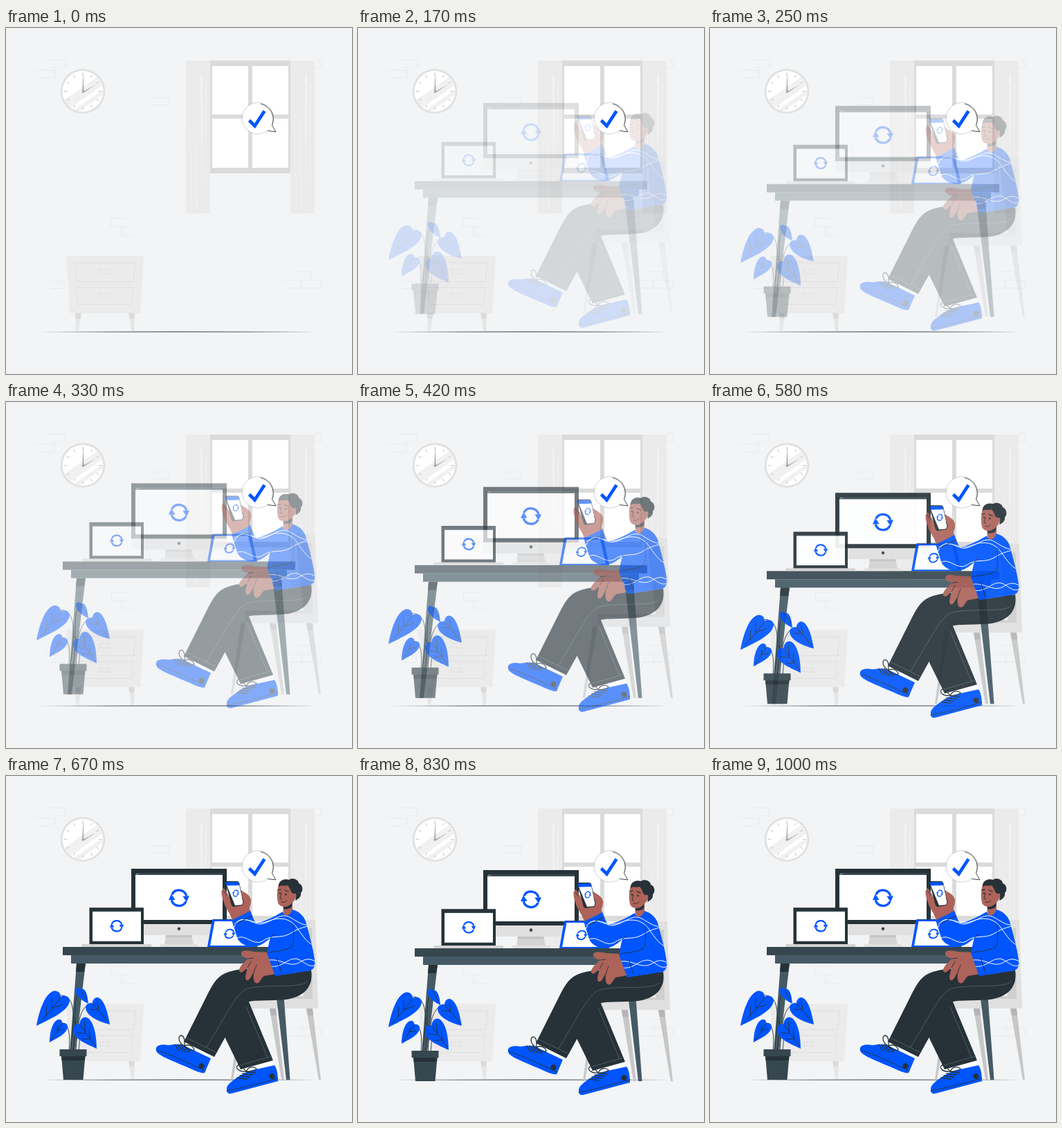
An HTML page for the animation above (1.04 s loop, 500 px wide and 500 px high).

```html
<!DOCTYPE html>
<html lang="en">
<head>
<meta charset="utf-8">
<title>Synced devices</title>
<style>
html, body { margin: 0; width: 100%; height: 100%; overflow: hidden; background: #f2f4f6; }
svg { display: block; width: 100vw; height: 100vh; }
.blue { fill: #05f; }
.ink { fill: #263238; }
.slate { fill: #37474f; }
.steel { fill: #455a64; }
.white { fill: #fff; }
.skin { fill: #ad6359; }
.g1 { fill: #ebebeb; }
.g2 { fill: #e0e0e0; }
.g3 { fill: #dbdbdb; }
.g4 { fill: #c7c7c7; }
.line, .lace { fill: none; stroke: #263238; stroke-width: .9; stroke-linecap: round; stroke-linejoin: round; }
.lace { stroke-width: 1.3; }
.seam { fill: none; stroke: #5c6d75; stroke-width: .7; }
.wave { fill: none; stroke: #fff; stroke-width: 1; }
.pale { fill: none; stroke: #dcdcdc; stroke-width: .8; }
</style>
</head>
<body>
<svg viewBox="0 0 500 500">
  <defs>
    <g id="half">
      <path d="M-10.2 -5A11.3 11.3 0 0 1 10.8 -3" fill="none" stroke="#05f" stroke-width="3.300"/>
      <path class="blue" d="M5.400 -2.600L15 -3L11 5.800Z"/>
    </g>
    <g id="sync"><use href="#half"/><use href="#half" transform="rotate(180)"/></g>
    <path id="sweater" d="M326 208L353 194C355 201 358 207 361 213C375 210 388 203 400 196C401 204 411 203 414 193C424 196 430 202 433 210C439 232 444 250 446 266C447 274 445 279 440 281L389 289L377 256C379 248 380 240 382 234C374 241 366 247 355 247C343 246 334 238 333 230Z"/>
    <clipPath id="knit"><use href="#sweater"/></clipPath>
    <clipPath id="dial"><circle cx="111" cy="91.5" r="29.5"/></clipPath>
    <g id="curtain">
      <path class="g1" d="M0 47H35V268H0Z"/>
      <path fill="#f3f3f3" d="M6 76L8 255L9 255ZM12 67L15 262L16.2 262ZM21 68L22.5 250L24 68ZM28 80L27.5 240L29.5 80Z"/>
    </g>
  </defs>

  <g id="room">
    <path fill="none" stroke="#e5e6e7" stroke-width=".8" d="M58 46H86V57H67M42 61H71V72H48M208 101H236V111H213M176 275H152V287H177M167 288V300H193M446 46H456V57H446M58 366H84V376.500H65M415 352H441V362H427M401 365H427V376H407M428 365H456V376H428"/>
    <path class="g3" d="M295 47H411V210H295Z"/>
    <path class="white" d="M298 55H350V125H298ZM356 55H408V125H356ZM298 131H350V202H298ZM356 131H408V202H356Z"/>
    <use href="#curtain" x="260"/><use href="#curtain" x="411"/>
    <circle class="g2" cx="111" cy="91.5" r="32.300"/>
    <circle class="white" cx="111" cy="91.5" r="29.5"/>
    <path clip-path="url(#dial)" fill="#f1f1f1" d="M78 108L136 68L144 80L92 116ZM97 119L142 88L144 93L104 122Z"/>
    <g id="ticks" stroke="#bbb" stroke-width=".8"></g>
    <path d="M110.300 92L111.500 64L112.500 92ZM110.500 92.500L130 81.500L111.500 94Z" fill="#a6a6a6"/>
    <circle cx="111.200" cy="92" r="1.8" fill="#a6a6a6"/>
    <path class="g3" d="M100 412H109L107.500 420H100.500ZM177 412H186L185.500 420H178.500Z"/>
    <path fill="#e6e6e6" d="M100.500 420H107.500L105 438H101ZM178.500 420H185.500L185 438H181Z"/>
    <path class="g1" d="M87 329H199L194 412H92Z"/>
    <path class="pale" d="M100 339H187L184.500 366.500H102ZM101 375H183.500L181.500 399.500H103.500ZM135 349H149.500V355.500H135ZM135 384H149.500V390H135Z"/>
    <path class="ink" d="M48 439Q250 438 452 439Q250 440 48 439Z"/>
  </g>

  <g class="drop">
    <path class="g4" d="M381 336H390L402 439H398ZM434 336H443L455 439H452ZM339 336H346L328 439H325Z"/>
    <path fill="#b5b5b5" d="M381 336H390L391 346H382.500ZM434 336H443L444 346H436Z"/>
    <path class="g2" d="M419 208H447L451 336H345V318H430Z"/>
    <path fill="#cfcfcf" d="M419 220H442L443 322H345V318H430Z"/>
  </g>

  <g class="drop">
    <path class="steel" d="M102 271H115L95 439H89ZM385 271H398L410.500 439H405Z"/>
    <path class="ink" d="M102 271H115L113 283H101ZM385 271H398L399 283H386Z"/>
    <path class="steel" d="M94 259H406V271H94Z"/>
    <path class="slate" d="M82 247H418V259H82Z"/>
  </g>

  <g class="drop">
    <path fill="#d3d3d3" d="M231 229H268L271 244H229Z"/>
    <path class="g2" d="M223 243H277V247H223ZM181 214H319V230H181Z"/>
    <path fill="#c4c4c4" d="M231 230H268L268.500 233H230.500Z"/>
    <path class="ink" d="M181 134H319V214H181Z"/>
    <path class="white" d="M187 143H313V208H187Z"/>
    <path class="slate" d="M187 140H313V143H187Z"/>
    <path stroke="#b0bec5" stroke-width=".8" d="M188 141.500H192"/>
    <circle class="slate" cx="250" cy="220.700" r="2.300"/>
    <use href="#sync" transform="translate(250 176.300)"/>
  </g>

  <g class="drop">
    <path fill="#d3d3d3" d="M109.500 243H210V247H109.500Z"/>
    <path class="ink" d="M120.500 190.300H199V243H120.500Z"/>
    <path class="white" d="M125 196H195V238.700H125Z"/>
    <path class="slate" d="M125 194.500H195V196H125Z"/>
    <use href="#sync" transform="translate(160 216.800) scale(.68)"/>
  </g>

  <g class="drop">
    <path class="ink" d="M299 207H354L363 247H292Z"/>
    <path class="blue" d="M298 207.500H353L362 247H291Z"/>
    <path class="white" d="M301.500 210H350L358 245H295Z"/>
    <use href="#sync" transform="translate(323 228) skewX(-8) scale(.56)"/>
  </g>

  <g class="drop">
    <path class="line" d="M93 396C98 360 104 316 79 317M97 396C103 360 96 320 105 314M101 396C104 362 104 334 124 328M91 396C93 378 92 356 80 357M105 396C108 376 106 358 98 355"/>
    <path class="blue" d="M44 361C48 340 55 318 66 312C73 308 79 313 79 319C86 316 92 319 92 325C90 340 66 350 44 361ZM119 329C106 323 100 315 101 309C102 305 106 305 109 308C114 306 118 314 119 329ZM150 359C130 354 115 345 115 334C116 329 121 327 125 329C125 322 130 318 135 321C143 326 147 342 150 359ZM63 385C63 370 67 357 73 353C78 350 82 353 81 357C87 356 90 360 89 364C86 374 74 378 63 385ZM131 394C116 387 98 380 97 368C97 360 101 357 106 359C107 351 112 347 117 349C127 354 131 375 131 394Z"/>
    <path class="line" d="M79 320Q66 338 50 355M66 322L66 336L82 330M59 332L58 346M125 329Q138 342 147 355M132 326L134 338L121 337M81 358Q74 368 66 381M75 361L74 368L84 366M106 359Q119 376 129 390M113 355L115 372L102 371M120 366L122 380L110 380M108 309L116 323"/>
    <path class="slate" d="M80 404H114.500L111.500 439H83Z"/>
    <path class="ink" d="M80 404H114.500L114 411H80.500Z"/>
    <path class="slate" d="M77.500 395H116.500V405H77.500Z"/>
  </g>

  <g class="drop">
    <path class="white" d="M338 420L386 408L388 420L345 432ZM258 383L301 403L294 409L256 391Z"/>
    <path class="blue" d="M319 453C318 446 328 440 338 433C344 429 350 427 356 425L388 418C392 424 393 432 393 441L325 459C320 459 319 457 319 453ZM217 397C215 389 224 387 235 389C243 388 250 387 256 389L296 408L287 429C283 431 270 424 255 418C240 411 219 404 217 397Z"/>
    <path class="line" d="M319 455C340 452 366 444 393 437M218 396C240 403 264 415 288 426"/>
    <circle class="ink" cx="384.500" cy="434" r="4"/><circle class="ink" cx="282.500" cy="419" r="4"/>
    <path class="lace" d="M334 436L348 438M338 433L352 435M342 430L356 432M346 427L360 429M347 427C337 428 330 422 335 418C340 417 344 424 347 427C350 420 358 419 362 423C360 427 352 427 347 427M244 388L250 397M248 388L255 398M252 388L260 399M256 389L265 399M258 390C249 386 248 376 253 375C259 376 258 385 258 390C264 387 271 390 272 396C267 398 262 394 258 390"/>
    <path class="ink" d="M350 324L386 411L339 424L316 377L340 328Z"/>
    <path class="ink" d="M441 281C444 300 436 318 405 323C370 326 352 322 343 330L301 406L257 384L293 312C300 299 306 288 322 283C335 279 348 278 362 278L390 287C410 287 425 282 441 281Z"/>
    <path class="seam" d="M435 297C425 308 375 300 350 307C335 312 327 329 290 392M347 333L378 407M260 378L303 399M338 418L384 405"/>
    <path class="skin" d="M382 255L358 254C350 252 341 251 340 256C339 261 346 262 350 264C342 271 334 279 338 283C341 286 346 279 349 277C346 288 345 294 348 295C352 297 356 286 358 283C357 292 358 299 362 299.500C367 300 369 291 373 289L390 286Z"/>
    <path class="line" d="M349 277L354 268M358 284L362 273M350 264L358 263"/>

    <path class="skin" d="M400 182L414 176L414 198C410 204 404 206 401 203Z"/>
    <path class="ink" d="M401 187C406 188 410 186 414 182L413 189C409 193 404 193 401 192Z"/>
    <path class="skin" d="M394 157C392 163 391 174 393 183C395 189 402 190 407 188C412 186 416 181 418 177C424 177 425 167 419 167L415 158C408 152 399 152 394 157Z"/>
    <path class="ink" d="M394 160C393 153 400 147 409 150C414 146 423 150 423 155C429 157 430 166 426 169C427 174 423 178 418 180C420 174 420 168 416 170C411 170 412 163 407 158C402 160 398 157 394 160Z"/>
    <path class="line" d="M398 170L396 177L399 178M398 182Q403 184 406 180"/>
    <path class="lace" d="M393 165L397 164M403 165L408 167"/>
    <circle class="ink" cx="396" cy="169.500" r="1.300"/><circle class="ink" cx="404.500" cy="171" r="1.300"/>

    <use class="blue" href="#sweater"/>
    <g class="wave" clip-path="url(#knit)">
      <path d="M328 222C338 196 352 212 366 214C382 214 395 196 410 204C423 211 430 219 448 214M330 214C346 198 358 218 378 210C398 202 412 207 421 220C429 231 437 245 450 246M330 237C344 224 355 246 370 239C384 228 396 236 410 228C421 221 428 219 440 216M380 266C398 264 409 277 423 270C434 263 440 263 450 270M382 275C400 278 408 260 423 265C434 271 440 279 450 271"/>
    </g>
    <path class="line" d="M415 214C416 232 416 245 412 248C403 252 393 253 380 255M391 263L398 284M331 214L356 202M382 234L389 228"/>

    <path class="skin" d="M315 162C309 164 312 175 315 183C317 191 324 198 327 208L353 195C350 190 355 187 354 179C352 172 345 169 340 165C336 170 341 178 340 185L326 180Z"/>
    <path class="ink" d="M317 154Q316.500 152 319 152L334 152Q336 152 337 154L344 184Q344 187 341 187L329 189Q327 189 326 187Z"/>
    <path class="white" d="M319 158L337 157L343 184Q343 186 341 186L331 187Z"/>
    <path class="blue" d="M317.500 153.500L335.500 153L337 158L319 158.500Z"/>
    <use href="#sync" transform="translate(332 169.500) rotate(20) scale(.32 .4)"/>
    <path class="skin" d="M340 167C347 168 354 174 354 180C354 187 349 189 347 192L338 190C343 184 344 181 341 176Z"/>
    <path class="line" d="M314 166L319 172M341 176Q345 182 341 187"/>
  </g>

  <g id="bubble">
    <path class="white" d="M384.500 140.500L390 150L378 148.500A22.800 22.800 0 1 1 384.500 140.500Z"/>
    <path fill="none" stroke="#263238" stroke-width=".5" stroke-opacity=".45" d="M378 148.500A22.800 22.800 0 1 1 384.500 140.500"/>
    <path fill="none" stroke="#263238" stroke-width=".9" stroke-linejoin="round" d="M368 109.500A22.800 22.800 0 0 1 384.500 140.500L390 150L378 148.500"/>
    <path fill="none" stroke="#05f" stroke-width="4.800" d="M351.500 133.500L359.500 141.500L373.500 120"/>
  </g>
</svg>
<script>
const LOOP = 1040, STEPS = 25, RISE = 30;
const pieces = document.querySelectorAll('.drop');

document.getElementById('ticks').innerHTML = Array.from({ length: 12 }, (_, i) =>
  `<path d="M111 64.5V69" transform="rotate(${i * 30} 111 91.5)"/>`).join('');

const cubic = (a, b, s) => 3 * (1 - s) ** 2 * s * a + 3 * (1 - s) * s * s * b + s ** 3;

// cubic-bezier(.36, -.01, .5, 1.38): settles after a small overshoot
function ease(x) {
  let lo = 0, hi = 1;
  for (let i = 0; i < 24; i++) {
    const mid = (lo + hi) / 2;
    if (cubic(.36, .5, mid) < x) lo = mid; else hi = mid;
  }
  return cubic(-.01, 1.38, hi);
}

function render(ms) {
  const step = Math.min(STEPS - 1, Math.floor((ms % LOOP + 5) / (LOOP / STEPS)));
  const y = ease((step + 1) / STEPS);
  const opacity = step < 2 ? 0 : Math.min(1, y);
  for (const piece of pieces) {
    piece.setAttribute('opacity', opacity);
    piece.setAttribute('transform', `translate(0 ${(y - 1) * RISE})`);
  }
}

const start = performance.now();
function tick() {
  render(performance.now() - start);
  requestAnimationFrame(tick);
}
render(0);
requestAnimationFrame(tick);
</script>
</body>
</html>
```
